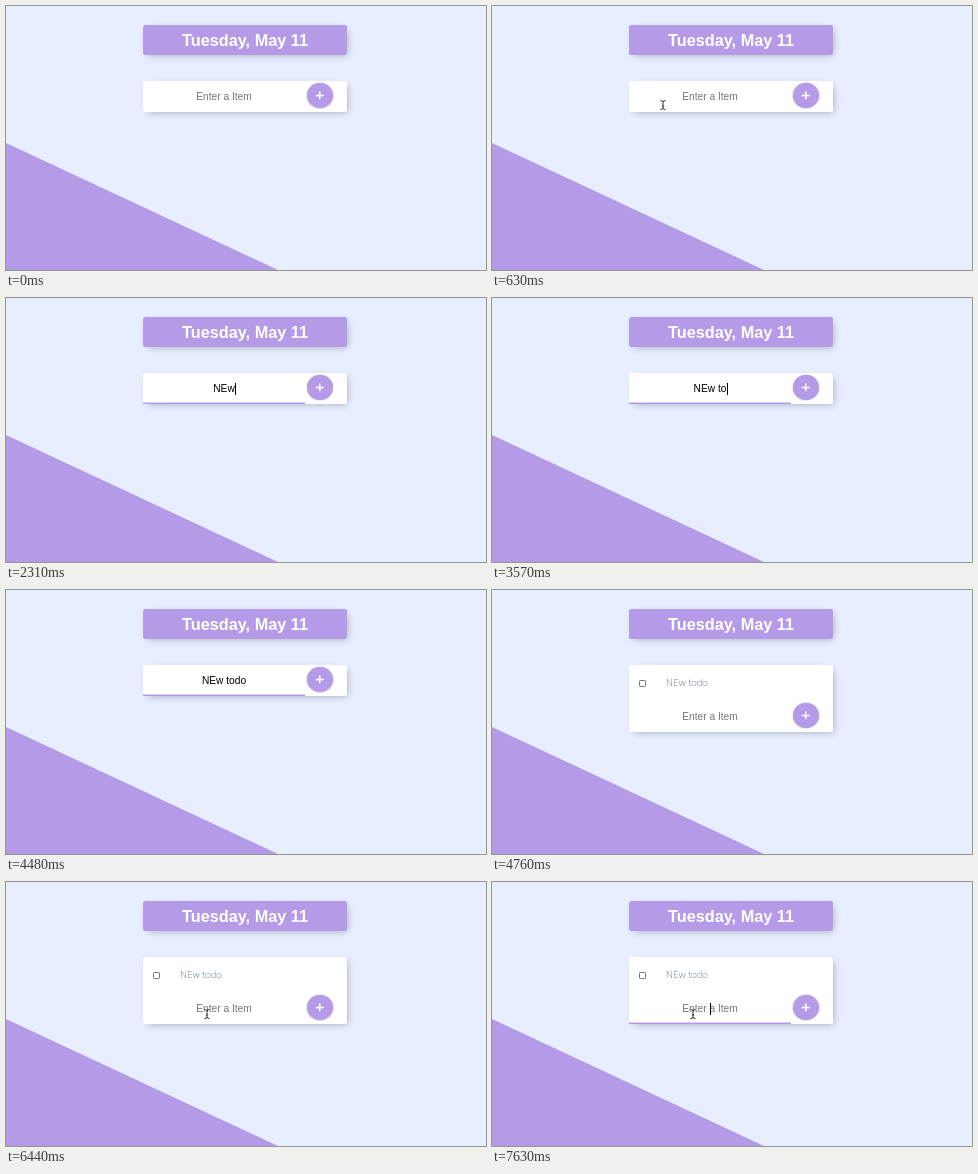
An HTML page that plays this animation: 480 by 264 pixels, repeating every 8000 ms.

```html
<!DOCTYPE html>
<html lang="en">
<head>
<meta charset="utf-8">
<title>Todo list</title>
<style>
  html, body { margin: 0; width: 100%; height: 100%; overflow: hidden; }
  body { position: relative; background: #e7eeff; font-family: "Liberation Sans", Arial, sans-serif; }
  body > *, .card > *, #caret { position: absolute; }
  svg { left: 0; top: 0; }
  .box { left: 137px; width: 204px; border-radius: 2.5px; box-shadow: 2.5px 2.5px 7.6px -2.5px rgba(0, 0, 0, .3); }
  h1 { top: 19px; height: 30px; margin: 0; background: #b59ae8; color: #fff; font: bold 16.3px/31px "Liberation Sans", Arial, sans-serif; text-align: center; }
  .card { top: 74.5px; background: #fff; }
  #check { left: 10px; top: 15px; width: 5px; height: 5px; border: .9px solid #767676; border-radius: 1.2px; }
  #todo { left: 37px; top: 9px; font: 200 9.9px/18px Roboto, "Liberation Sans", sans-serif; color: #00204a; white-space: pre; }
  #input { left: 0; bottom: 0; width: 162px; height: 31.5px; line-height: 31.5px; font-size: 10.2px; text-align: center; white-space: pre; }
  #input.focus { box-shadow: inset 0 -1.6px #b59ae8; }
  #value { position: relative; }
  #caret { width: 1px; height: 12px; margin-top: 10px; top: 0; background: #000; }
  #add { left: 164px; bottom: 3.7px; width: 25.5px; height: 25.5px; border-radius: 50%; background: #b59ae8; box-shadow: 0 0 2px rgba(0, 0, 0, .3); color: #fff; font-size: 15.3px; line-height: 23.5px; text-align: center; -webkit-text-stroke: .4px #fff; }
</style>
</head>
<body>
<svg width="480" height="264"><path d="M0 137L272 264H0Z" fill="#b59ae8"/></svg>
<h1 class="box">Tuesday, May 11</h1>
<div class="box card" id="card">
  <div id="check"></div>
  <div id="todo">NEw todo</div>
  <div id="input"><span id="value"></span><div id="caret"></div></div>
  <div id="add">+</div>
</div>
<svg width="480" height="264">
  <g id="pointer">
    <circle id="ring" r="7.6" fill="#fff" fill-opacity=".3" stroke="#000" stroke-width="1.6"/>
    <path id="beam" d="M-2.5-4.5Q0-4.5 0-3V3Q0 4.5-2.5 4.5M2.5-4.5Q0-4.5 0-3M0 3Q0 4.5 2.5 4.5M-1.2 1H1.2" fill="none" stroke="#333"/>
    <path id="arrow" d="M0 0V10.5L2.4 8.3 4 12 5.6 11.3 4 7.7H7.3Z" stroke="#fff" stroke-width=".8"/>
  </g>
</svg>
<script>
const LOOP = 8000, STEP = 70, SUBMIT = 4760;
const el = id => document.getElementById(id);
const [card, check, todo, input, value, caret, pointer, ring, beam, arrow] =
  ['card', 'check', 'todo', 'input', 'value', 'caret', 'pointer', 'ring', 'beam', 'arrow'].map(el);

const keyTimes = [2030, 2170, 2310, 2520, 2660, 3570, 3780, 3990];
const clicks = [1120, 6510];
const caretOff = [[1610, 2030], [3220, 3570], [4480, SUBMIT], [7070, 7560]];

// Each trip: visible from its first point until `end`; points are [time, x, y].
const trips = [
  { end: 2030, points: [[140, 92, 238], [420, 138, 150], [700, 182, 82], [770, 182, 82], [910, 223, 94]] },
  { end: LOOP, points: [[5530, 226, 93], [5740, 236, 112], [5950, 222, 135], [6160, 201, 132]] }
];

const within = (t, [from, to]) => t >= from && t < to;
const show = (node, on) => { node.style.display = on ? '' : 'none'; };

function position(points, t) {
  const next = points.findIndex(p => p[0] > t);
  if (next < 0) return points[points.length - 1].slice(1);
  const a = points[next - 1], b = points[next];
  const k = (t - a[0]) / (b[0] - a[0]);
  return [a[1] + (b[1] - a[1]) * k, a[2] + (b[2] - a[2]) * k];
}

function drawPointer(t) {
  const trip = trips.find(({ points, end }) => within(t, [points[0][0], end]));
  show(pointer, trip);
  if (!trip) return;
  const [x, y] = position(trip.points, t);
  const top = t < SUBMIT ? 75 : 111;
  const overInput = x > 137 && x < 299 && y > top && y < top + 31;
  pointer.setAttribute('transform', `translate(${x} ${y})`);
  show(beam, overInput);
  show(arrow, !overInput);
  show(ring, clicks.some(c => within(t, [c, c + 140])));
}

function draw(t) {
  const submitted = t >= SUBMIT;
  const typed = submitted ? '' : 'NEw todo'.slice(0, keyTimes.filter(k => k <= t).length);
  const focused = within(t, [clicks[0], SUBMIT]) || t >= clicks[1];

  card.style.height = submitted ? '67.5px' : '31.5px';
  show(check, submitted);
  show(todo, submitted);

  value.textContent = typed || 'Enter a Item';
  value.style.color = typed ? '#000' : '#757575';
  input.classList.toggle('focus', focused);
  show(caret, focused && !caretOff.some(span => within(t, span)));
  caret.style.left = (typed ? 81 + value.offsetWidth / 2 : 80.5) + 'px';

  drawPointer(t);
}

function frame() {
  const t = performance.now() % LOOP;
  draw(Math.floor(t / STEP) * STEP);
  requestAnimationFrame(frame);
}
frame();
</script>
</body>
</html>
```
